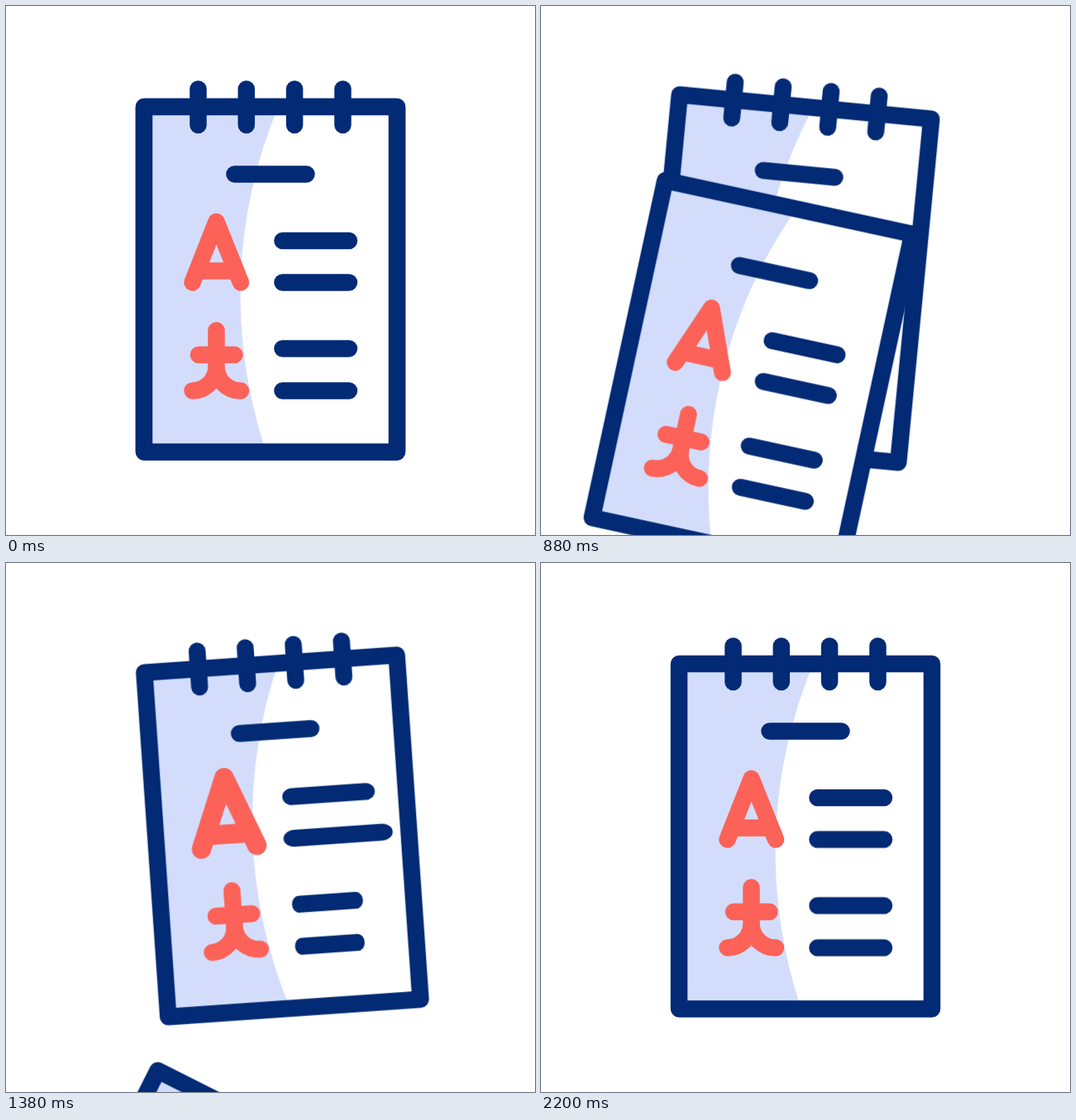
An HTML page without scripts that plays this animation: 640x640 px, repeating every 2400 ms.

```html
<!DOCTYPE html>
<html lang="en">
<head>
<meta charset="utf-8">
<title>Language notepad</title>
<style>
html, body { margin: 0; width: 100%; height: 100%; overflow: hidden; background: #fff; }
svg { display: block; width: 100vw; height: 100vh; }

.ink, .red { fill: none; stroke: #022a75; stroke-width: 20.5; stroke-linecap: round; stroke-linejoin: round; }
.red { stroke: #fc6258; }
.ink path, .red path { vector-effect: non-scaling-stroke; }

.pad, .page, .row, .glyph {
  animation: 2400ms cubic-bezier(.333, 0, .667, 1) infinite;
}
.pad { transform-origin: 320px 122px; animation-name: swing; }
.page { transform-origin: 320px 122px; animation-name: fall; }
.row { transform-origin: 334.5px 0; animation-name: stretch; animation-delay: var(--at); }
.glyph { transform-origin: 254.5px var(--mid); animation-name: pop; animation-delay: var(--at); }

@keyframes swing {
  0%, 8.333% { transform: rotate(0deg); }
  33.333% { transform: rotate(6deg); }
  58.333% { transform: rotate(-4deg); }
  75% { transform: rotate(2deg); }
  91.667%, 100% { transform: rotate(0deg); }
}
@keyframes fall {
  0%, 25% { transform: translate(0px, 0px) rotate(0deg); }
  66.667%, 100% { transform: translate(-44px, 638px) rotate(35deg); }
}
@keyframes stretch {
  0% { transform: scaleX(1); }
  12.5% { transform: scaleX(.75); }
  25% { transform: scaleX(1.317); }
  37.5%, 100% { transform: scaleX(1); }
}
@keyframes pop {
  0% { transform: scale(1); }
  16.667% { transform: scale(1.345); }
  25%, 100% { transform: scale(1); }
}
</style>
</head>
<body>
<svg viewBox="0 0 640 640">
  <defs>
    <g id="sheet">
      <path fill="#fff" d="M167 122H473V539.5H167Z"/>
      <path fill="#d3ddfb" d="M167 122H329.3A591 591 0 0 0 314.8 539.5H167Z"/>
      <g class="ink">
        <path d="M167 122H473V539.5H167Z"/>
        <path d="M276.5 203.5H363.5"/>
      </g>
    </g>
    <path id="row" d="M334.5 284H415"/>
    <path id="latin" d="M225.5 334.5L254.5 261L284 334.5M233 320.5H276"/>
    <path id="hanzi" d="M254.5 392.5V436A29.25 29.5 0 0 1 225.5 465.5M254.5 436A29.25 29.5 0 0 0 284 465.5M233 422H276.5"/>
    <path id="pin" d="M232.5 100.5V144"/>
  </defs>

  <g class="pad">
    <use href="#sheet"/>
    <g class="red">
      <use href="#latin" class="glyph" style="--at:1200ms;--mid:298px"/>
      <use href="#hanzi" class="glyph" style="--at:1400ms;--mid:429px"/>
    </g>
    <g class="ink">
      <use href="#row" class="row" style="--at:600ms"/>
      <use href="#row" class="row" style="--at:800ms" y="50.5"/>
      <use href="#row" class="row" style="--at:1000ms" y="130.5"/>
      <use href="#row" class="row" style="--at:1200ms" y="181.5"/>
    </g>

    <!-- loose page that drops off -->
    <g class="page">
      <use href="#sheet"/>
      <g class="red">
        <use href="#latin"/>
        <use href="#hanzi"/>
      </g>
      <g class="ink">
        <use href="#row"/>
        <use href="#row" y="50.5"/>
        <use href="#row" y="130.5"/>
        <use href="#row" y="181.5"/>
      </g>
    </g>

    <g class="ink">
      <use href="#pin"/>
      <use href="#pin" x="58.3"/>
      <use href="#pin" x="116.6"/>
      <use href="#pin" x="175"/>
    </g>
  </g>
</svg>
</body>
</html>
```
